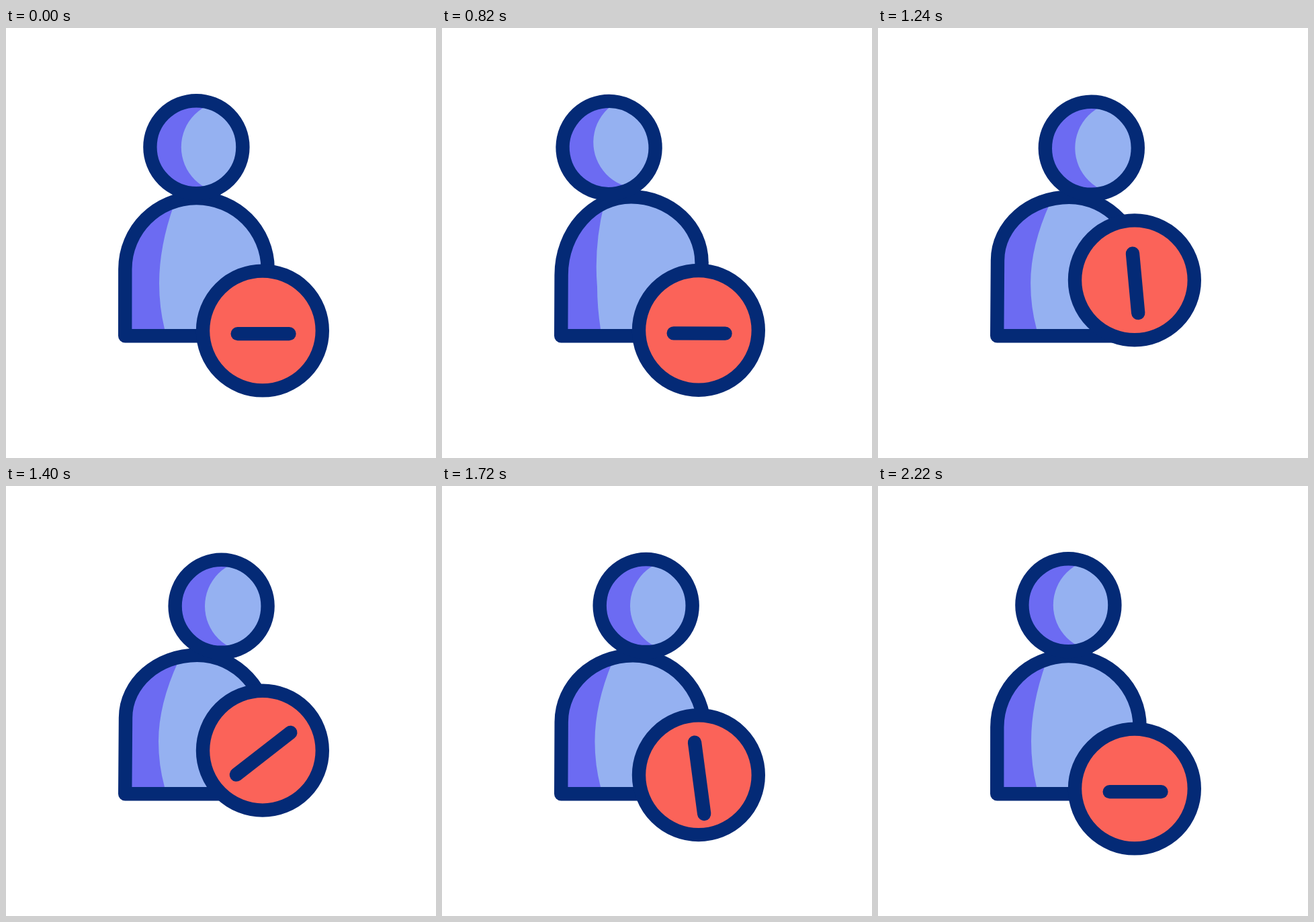
An HTML page with a canvas for the animation above (2400 ms loop, 640 px wide and 640 px high).

```html
<!DOCTYPE html>
<html>
<head>
<meta charset="utf-8">
<style>
  html, body { margin: 0; height: 100%; overflow: hidden; background: #fff; }
  canvas { display: block; }
</style>
</head>
<body>
<canvas width="640" height="640"></canvas>
<script>
const LOOP = 2400;
const NAVY = '#042a76', PURPLE = '#6c6bf2', LIGHT = '#95b1f1', RED = '#fb6359';
const ctx = document.querySelector('canvas').getContext('2d');

const clamp01 = x => Math.min(1, Math.max(0, x));
const ease = (t, from, to) => {
  const p = clamp01((t - from) / (to - from));
  return p * p * (3 - 2 * p);
};

// Rest value plus weighted offsets for leaning left and right
let left, right;
const lean = (rest, toLeft, toRight) => rest + left * toLeft + right * toRight;

function circle(x, y, r) {
  const path = new Path2D();
  path.arc(x, y, r, 0, Math.PI * 2);
  return path;
}

// Purple shape with a clipped light area and a navy outline
function shaded(outline, light) {
  ctx.save();
  ctx.clip(outline);
  ctx.fillStyle = PURPLE;
  ctx.fill(outline);
  ctx.fillStyle = LIGHT;
  ctx.fill(light);
  ctx.restore();
  ctx.stroke(outline);
}

function drawBody() {
  const K = 0.5523;
  const lx = lean(177.3, 0.3, 0.7), ly = lean(359, 9, -14);
  const ax = lean(283.5, -2, 1), ay = lean(253, -1.8, -1.3);
  const rx = lean(389.7, -3.2, 1.5), ry = lean(359, -10, 8);
  const body = new Path2D();
  body.moveTo(177.2, 458.2);
  body.lineTo(lx, ly);
  body.bezierCurveTo(lx, ly - K * (ly - ay), ax - K * (ax - lx), ay, ax, ay);
  body.bezierCurveTo(ax + K * (rx - ax), ay, rx, ry - K * (ry - ay), rx, ry);
  body.lineTo(389.7, 458.2);
  body.closePath();

  const tx = lean(250, -9, 6.5), ty = lean(263, 0, -2);
  const mx = lean(228, 3, -1), my = lean(380, 5, 0);
  const light = new Path2D();
  light.moveTo(tx, 230);
  light.lineTo(tx, ty);
  light.quadraticCurveTo(lean(228, -2, -1), 325, mx, my);
  light.quadraticCurveTo(mx, 415, 236, 448);
  light.lineTo(238, 460);
  light.lineTo(420, 460);
  light.lineTo(420, 230);
  shaded(body, light);
}

function drawHead() {
  ctx.save();
  ctx.translate(lean(283.4, -35.2, 37.2), lean(177.2, 0.8, 1.6));
  ctx.rotate(lean(0, -10, 0) * Math.PI / 180);
  shaded(circle(0, 0, 69), circle(lean(46, 0, -2), 0, 68.6));
  ctx.restore();
}

// A tall hop followed by a lower bounce
function hop(t) {
  if (t < 1200) return 76 * ease(t, 800, 1200);
  if (t < 1600) return 76 * (1 - ((t - 1200) / 400) ** 2);
  if (t < 1900) return 31.5 * (1 - ((1900 - t) / 300) ** 2);
  return 31.5 * (1 - ease(t, 1900, 2200));
}

function drawBadge(t) {
  const half = 38.4 + 17 * (ease(t, 1000, 1600) - ease(t, 1600, 2200));
  ctx.save();
  ctx.translate(381.9, 450.5 - hop(t));
  const disc = circle(0, 0, 88.9);
  ctx.fillStyle = RED;
  ctx.fill(disc);
  ctx.stroke(disc);
  ctx.translate(1.2, 4.6);
  ctx.rotate(Math.PI * 2 * ease(t, 800, 2200));
  ctx.beginPath();
  ctx.moveTo(-half, 0);
  ctx.lineTo(half, 0);
  ctx.stroke();
  ctx.restore();
}

function draw(now) {
  const t = now % LOOP;
  const swing = ease(t, 800, 1300);
  left = ease(t, 200, 600) - swing;
  right = swing - ease(t, 1533, 1933);
  ctx.fillStyle = '#fff';
  ctx.fillRect(0, 0, 640, 640);
  ctx.strokeStyle = NAVY;
  ctx.lineWidth = 20.4;
  ctx.lineCap = ctx.lineJoin = 'round';
  drawBody();
  drawHead();
  drawBadge(t);
}

const start = performance.now();
function tick() {
  draw(performance.now() - start);
  requestAnimationFrame(tick);
}
tick();
</script>
</body>
</html>
```
